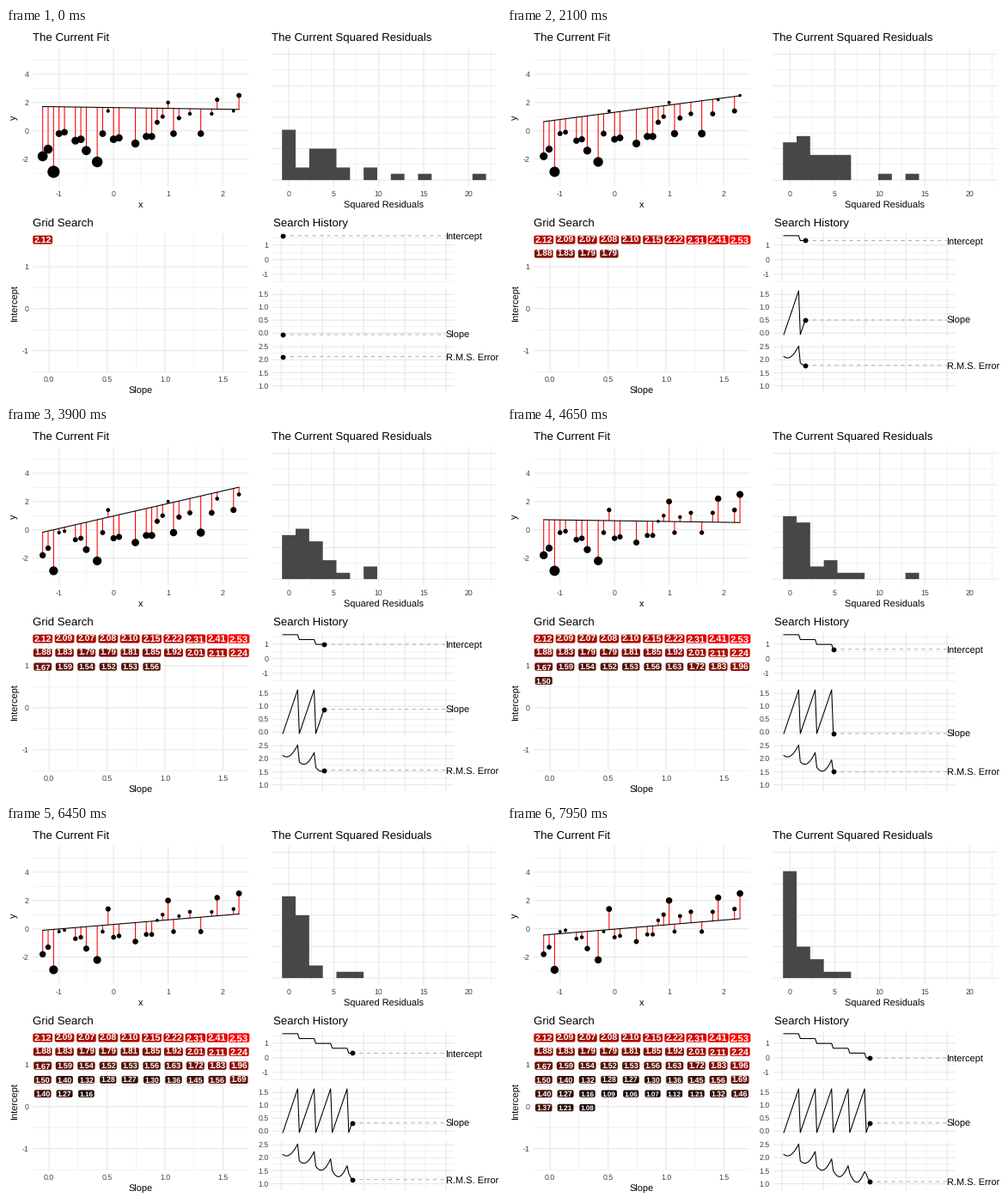
These frames come from a looping animation (576 px wide and 432 px high, 8 s). A matplotlib script:

```python
import numpy as np
import matplotlib.pyplot as plt
from matplotlib.animation import FuncAnimation
from matplotlib.collections import LineCollection
from matplotlib.patches import FancyBboxPatch

plt.rcParams["font.family"] = "Liberation Sans"
plt.rcParams["text.hinting"] = "no_hinting"
plt.rcParams["path.snap"] = False

W, H = 576, 432
STEP, TICK, LOOP = 150, 50, 8000
THIN, THICK = 0.53, 1.07
GRID, GUIDE, AXIS_TEXT, BAR = "#E7E7E7", "#B2B2B2", "#404040", "#474747"

# Observations
X = np.array([-13, -12, -11, -10, -9, -7, -6, -5, -3, -2, -1, 0, 1, 4, 6, 7,
              8, 9, 10, 11, 12, 14, 16, 18, 19, 22, 23]) / 10
Y = np.array([-18, -13, -29, -2, -1, -7, -6, -14, -22, -2, 14, -6, -5, -9, -4, -4,
              6, 10, 20, -2, 9, 12, -2, 12, 22, 14, 25]) / 10

# Search grid: slope runs fastest, intercept falls row by row
SIDE = 10
slopes = np.linspace(-0.056, 1.6383, SIDE)
intercepts = 1.6415 - 0.3329 * np.arange(SIDE)
B, M = (g.ravel() for g in np.meshgrid(intercepts, slopes, indexing="ij"))
residuals = Y - (B[:, None] + M[:, None] * X)
rms = np.sqrt((residuals ** 2).mean(axis=1))
level = (rms - rms.min()) / (rms.max() - rms.min())
worst = np.abs(residuals).max()

fig = plt.figure(figsize=(W / 72, H / 72), dpi=72, facecolor="white")
ax = fig.add_axes([0, 0, 1, 1])
ax.axis("off")


def text(x, y, s, size=11, color="black", ha="left", **kw):
    return ax.text(x, y, s, fontsize=size, color=color, ha=ha, va="baseline", **kw)


class Panel:
    """Maps data to stage pixels, with a 5% margin on each side."""

    def __init__(self, box, xlim, ylim):
        self.left, self.top, self.right, self.bottom = box
        self.xlim, self.ylim = xlim, ylim

    def px(self, x):
        lo, hi = self.xlim
        return self.left + (self.right - self.left) * ((x - lo) / (hi - lo) + 0.05) / 1.1

    def py(self, y):
        lo, hi = self.ylim
        return self.bottom - (self.bottom - self.top) * ((y - lo) / (hi - lo) + 0.05) / 1.1

    def grid(self, xs, x_minor, ys, y_minor):
        for vx, vy, width in ((x_minor, y_minor, THIN), (xs, ys, THICK)):
            lines = [[(self.px(x), self.top), (self.px(x), self.bottom)] for x in vx]
            lines += [[(self.left, self.py(y)), (self.right, self.py(y))] for y in vy]
            ax.add_collection(LineCollection(lines, colors=GRID, linewidths=width, zorder=1))

    def x_ticks(self, values, fmt="{:g}"):
        for v in values:
            text(self.px(v), self.bottom + 11.6, fmt.format(v), 8.8, AXIS_TEXT, "center")

    def y_ticks(self, values, fmt="{:g}"):
        for v in values:
            text(self.left - 4.95, self.py(v) + 3.1, fmt.format(v), 8.8, AXIS_TEXT, "right")

    def titles(self, title, xlabel=None, ylabel=None):
        text(self.left, self.top - 8.2, title, 13.2)
        if xlabel:
            text((self.left + self.right) / 2, self.bottom + 25, xlabel, ha="center")
        if ylabel:
            text(13.1, (self.top + self.bottom) / 2, ylabel, ha="center",
                 rotation=90, rotation_mode="anchor")


# Shared layout
LEFT = (31.26, 282.5)
TOP = (23.3, 184.4)
LOWER = tuple(y + H / 2 for y in TOP)


def box(xs, ys):
    return xs[0], ys[0], xs[1], ys[1]


# Current fit
low = B[-1] + M[-1] * X[0]
high = B[0] + M[SIDE - 1] * X[-1]
fit = Panel(box(LEFT, TOP), (X[0], X[-1]), (low, high))
fit.grid(range(-1, 3), (-0.5, 0.5, 1.5), range(-2, 5, 2), range(-3, 6, 2))
fit.x_ticks(range(-1, 3))
fit.y_ticks(range(-2, 5, 2))
fit.titles("The Current Fit", "x", "y")
fit_x, fit_y = fit.px(X), fit.py(Y)
sticks = LineCollection([], colors="red", linewidths=THICK, zorder=2)
ax.add_collection(sticks)
fit_line, = ax.plot([], [], color="black", lw=THICK, zorder=3)
points = ax.scatter(fit_x, fit_y, color="black", linewidths=0, zorder=4)

# Squared residuals
BINS = 15
bin_width = worst ** 2 / (BINS - 1)
edges = (np.arange(BINS + 1) - 0.5) * bin_width
hist = Panel(box((309.3, 570.5), TOP), (edges[0], edges[-1]), (0, 20))
hist.grid(range(0, 21, 5), np.arange(2.5, 23, 5), range(0, 21, 5), np.arange(2.5, 20, 5))
hist.x_ticks(range(0, 21, 5))
hist.titles("The Current Squared Residuals", "Squared Residuals")
bars = ax.stairs(np.full(BINS, hist.py(0)), hist.px(edges), baseline=hist.py(0),
                 fill=True, color=BAR, lw=0, zorder=3)

# Grid search
search = Panel(box(LEFT, LOWER), (slopes[0], slopes[-1]), (intercepts[-1], intercepts[0]))
search.grid(np.arange(0, 1.6, 0.5), (0.25, 0.75, 1.25), (-1, 0, 1), (-1.5, -0.5, 0.5, 1.5))
search.x_ticks(np.arange(0, 1.6, 0.5), "{:.1f}")
search.y_ticks((-1, 0, 1))
search.titles("Grid Search", "Slope", "Intercept")


def heat(t):
    """Black to red, blended in Lab and slightly deepened."""
    stops = (0, 0.25, 0.5, 0.75, 1)
    channels = ((0, 63, 122, 186, 255), (0, 21, 27, 25, 0), (0, 8, 12, 9, 0))
    return [(np.interp(t, stops, c) / 255) ** 1.22 for c in channels]


def make_tag(i):
    x, y = search.px(M[i]), search.py(B[i])
    size = 7.6 + 3.8 * level[i]
    w, h = 1.946 * size + 2.4, 0.72 * size + 2.4
    patch = FancyBboxPatch((x - w / 2, y - h / 2), w, h, linewidth=0, facecolor=heat(level[i]),
                           boxstyle="round,pad=0,rounding_size=2", zorder=3)
    ax.add_patch(patch)
    label = text(x, y + 0.345 * size, f"{rms[i]:.2f}", size, "white", "center",
                 weight="bold", zorder=4)
    return patch, label


last_state = (LOOP - 1) // STEP - 1
tags = [make_tag(i) for i in range(last_state + 1)]


# Search history
class Track:
    HEIGHT, PITCH = 55.98, 64.23

    def __init__(self, row, name, values, majors, minors, fmt):
        top = LOWER[0] + row * self.PITCH
        self.panel = Panel(box((310.6, 521.6), (top, top + self.HEIGHT)), (0, 100),
                           (values.min(), values.max()))
        self.panel.grid(range(0, 101, 25), np.arange(12.5, 100, 25), majors, minors)
        self.panel.y_ticks(majors, fmt)
        self.xs = self.panel.px(np.arange(1, len(values) + 1))
        self.ys = self.panel.py(values)
        self.end = self.panel.px(100)
        self.guide, = ax.plot([], [], color=GUIDE, lw=THICK, dashes=(4, 4), zorder=2,
                              dash_capstyle="butt")
        self.line, = ax.plot([], [], color="black", lw=THICK, zorder=3)
        self.dot = ax.scatter([0], [0], s=5.8 ** 2, color="black", linewidths=0, zorder=4)
        self.label = text(self.end - 0.3, 0, name, zorder=4)

    def show(self, i):
        x, y = self.xs[i], self.ys[i]
        self.guide.set_data([x, self.end], [y, y])
        self.line.set_data(self.xs[:i + 1], self.ys[:i + 1])
        self.dot.set_offsets([(x, y)])
        self.label.set_y(y + 4)


tracks = [
    Track(0, "Intercept", B, (-1, 0, 1), (-1.5, -0.5, 0.5, 1.5), "{:g}"),
    Track(1, "Slope", M, np.arange(0, 1.6, 0.5), (0.25, 0.75, 1.25), "{:.1f}"),
    Track(2, "R.M.S. Error", rms, np.arange(1, 2.6, 0.5), (1.25, 1.75, 2.25), "{:.1f}"),
]
tracks[0].panel.titles("Search History")
ax.set(xlim=(0, W), ylim=(H, 0))


def update(frame):
    # The opening state is held for two steps
    i = max(0, frame * TICK // STEP - 1)
    predicted = fit.py(B[i] + M[i] * X)
    sticks.set_segments([[(x, y), (x, p)] for x, y, p in zip(fit_x, fit_y, predicted)])
    fit_line.set_data(fit_x[[0, -1]], predicted[[0, -1]])
    size = 1 + 5 * np.abs(residuals[i]) / worst
    radius = (size * 2.845 + 0.94) * 0.375 + 0.35
    points.set_sizes((2 * radius) ** 2)
    counts, _ = np.histogram(residuals[i] ** 2, edges)
    bars.set_data(values=hist.py(counts))
    for k, tag in enumerate(tags):
        for artist in tag:
            artist.set_visible(k <= i)
    for track in tracks:
        track.show(i)
    return []


anim = FuncAnimation(fig, update, frames=LOOP // TICK, interval=TICK,
                     repeat=True, repeat_delay=0, blit=False)
plt.show()
```
